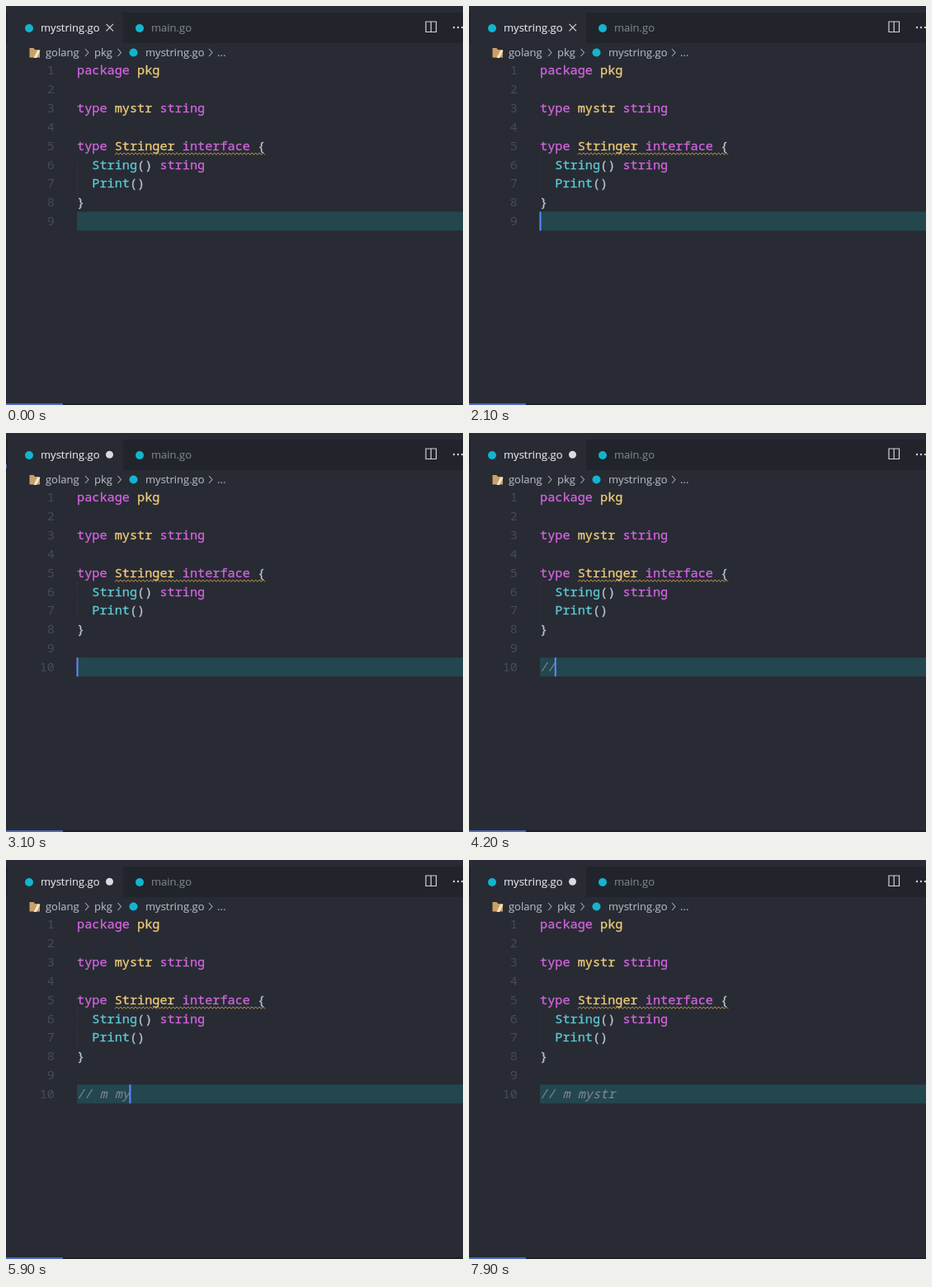
An HTML page that plays this animation: 554 px wide and 484 px high, repeating every 8000 ms.

```html
<!DOCTYPE html>
<html lang="en">
<head>
<meta charset="utf-8">
<title>Editor</title>
<style>
html, body { margin: 0; width: 100%; height: 100%; overflow: hidden; background: #282b33; }
svg { display: block; width: 554px; height: 484px; }
text { white-space: pre; fill: var(--ink); stroke: var(--ink); stroke-width: 0; }
.code { --ink: #bcc2cd; font: 15.22px "Noto Sans Mono", "DejaVu Sans Mono", monospace; stroke-width: 0.3; }
.ui { --ink: #afb3bb; font: 13px "Open Sans", "Noto Sans", sans-serif; stroke-width: 0.15; }
.num { --ink: #474b56; text-anchor: end; stroke-width: 0; }
.kw { --ink: #d264e0; }
.type { --ink: #efcb7a; }
.fn { --ink: #5cc8d3; }
.note { --ink: #7c858f; font-style: italic; stroke-width: 0.1; }
.bright { --ink: #e0e2e6; }
.dim { --ink: #7c8088; }
.line { fill: none; stroke: #d0d3d8; stroke-width: 1.2; }
.sep { fill: none; stroke: #a2a7af; stroke-width: 1.1; }
</style>
</head>
<body>
<svg viewBox="0 0 554 484" xmlns="http://www.w3.org/2000/svg">
  <rect width="554" height="484" fill="#282b33"/>
  <rect y="8" width="2" height="37" fill="#21242b"/>
  <rect x="142" y="8" width="412" height="37" fill="#21242b"/>
  <rect y="482" width="554" height="2" fill="#1e2128"/>
  <rect y="482" width="69" height="2" fill="#4d69bd"/>

  <g fill="#12b5cf">
    <circle cx="28" cy="27" r="5"/>
    <circle cx="162" cy="27" r="5"/>
    <circle cx="154.5" cy="56.5" r="5"/>
  </g>
  <text class="ui bright" x="42" y="31">mystring.go</text>
  <text class="ui dim" x="176" y="31">main.go</text>
  <path id="close" class="line" d="M121.5 21.800l8.500 8.500m0-8.500l-8.500 8.500"/>
  <circle id="dirty" cx="125.5" cy="26.200" r="4.500" fill="#d9dbe0"/>
  <path class="line" d="M509 19h12.500v12.500h-12.500zM515.200 19v12.500"/>
  <g fill="#d0d3d8">
    <circle cx="543" cy="26" r="1.200"/>
    <circle cx="548" cy="26" r="1.200"/>
    <circle cx="553" cy="26" r="1.200"/>
  </g>

  <path d="M28.500 51h5l1.500 2h6v9.500h-12.500z" fill="#c9a06a"/>
  <path d="M33.500 63l4.500-9h3.500l-4.500 9z" fill="#f3e7c8"/>
  <text class="ui" x="48" y="61">golang</text>
  <text class="ui" x="107" y="61">pkg</text>
  <text class="ui" x="169" y="61">mystring.go</text>
  <text class="ui" x="256" y="61">...</text>
  <path class="sep" d="M96 52l4 4.500-4 4.500M135.500 52l4 4.500-4 4.500M246 52l4 4.500-4 4.500"/>

  <rect id="active" x="86" width="468" height="23" fill="#23464f"/>
  <path d="M86.500 182v46" stroke="#383d46" stroke-dasharray="1 2"/>
  <g id="code"></g>
  <path id="wave" fill="none" stroke="#c2995a"/>
  <text id="note" class="code note" x="86"></text>
  <rect id="caret" width="2" height="23" fill="#5a8dff"/>
  <rect id="badge" y="38" width="1" height="5" fill="#5a6fc0"/>
</svg>
<script>
const LOOP = 8000, LEFT = 86, CHAR = 9.13, ROW = 22.85;
const $ = id => document.getElementById(id);
const baseline = row => 83.3 + row * ROW;
const rowTop = row => 66.7 + row * ROW;

const lines = [
  [["kw", "package "], ["type", "pkg"]],
  [],
  [["kw", "type "], ["type", "mystr "], ["kw", "string"]],
  [],
  [["kw", "type "], ["type", "Stringer "], ["kw", "interface "], ["", "{"]],
  [["fn", "  String"], ["", "() "], ["kw", "string"]],
  [["fn", "  Print"], ["", "()"]],
  [["", "}"]],
  [],
  []
];

function addText(cls, x, row, str) {
  const el = document.createElementNS("http://www.w3.org/2000/svg", "text");
  el.setAttribute("class", "code " + cls);
  el.setAttribute("x", x);
  el.setAttribute("y", baseline(row));
  el.textContent = str;
  $("code").append(el);
  return el;
}

lines.forEach((parts, row) => {
  const num = addText("num", 59, row, row + 1);
  if (row === 9) num.id = "lastNum";
  let col = 0;
  for (const [cls, str] of parts) {
    const word = str.trimStart();
    const indent = str.length - word.length;
    addText(cls, LEFT + (col + indent) * CHAR, row, word);
    col += str.length;
  }
});
$("note").setAttribute("y", baseline(9));
$("wave").setAttribute("d", "M132 180.500" + "l2.275-2.500 2.275 2.500".repeat(40));

const COMMENT = "// m mystr";
const ENTER = 3100;
const keys = [4000, 4200, 4400, 4700, 5500, 5700, 5800, 6000, 6200, 6400];

// The caret stays lit for half a second after each key, then blinks.
function caretOn(t, typed) {
  if (t < 1700) return false;
  const since = t < ENTER ? 1700 : typed ? keys[typed - 1] : ENTER;
  return Math.floor((t - since) / 500) % 2 === 0;
}

function show(id, on) {
  $(id).setAttribute("visibility", on ? "visible" : "hidden");
}

function draw(t) {
  const edited = t >= ENTER;
  const typed = keys.filter(k => t >= k).length;
  const top = rowTop(edited ? 9 : 8);
  show("close", !edited);
  show("dirty", edited);
  show("lastNum", edited);
  show("badge", edited && t < ENTER + 100);
  $("active").setAttribute("y", top);
  $("note").textContent = COMMENT.slice(0, typed);
  $("caret").setAttribute("x", LEFT + typed * CHAR - 0.5);
  $("caret").setAttribute("y", top);
  show("caret", caretOn(t, typed));
}

function tick() {
  draw(performance.now() % LOOP);
  requestAnimationFrame(tick);
}
tick();
</script>
</body>
</html>
```
